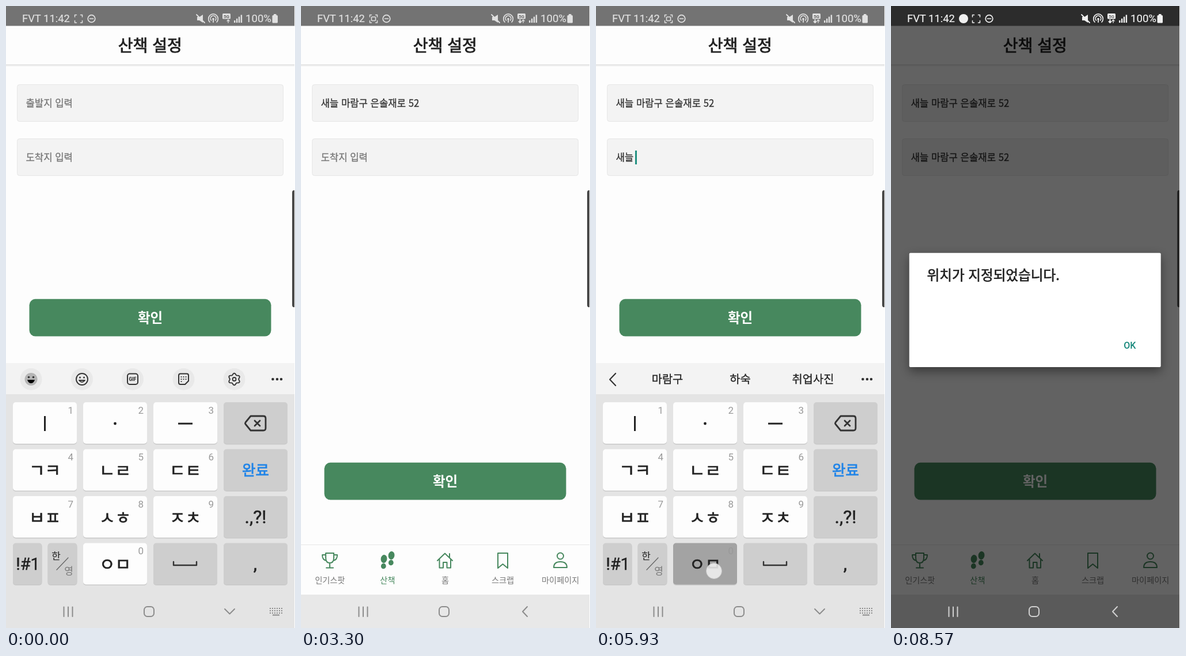
Recreate the animation shown at these times as an HTML page. Size 502 px wide and 1080 px high, loop 8.61 s.

```html
<!DOCTYPE html>
<html lang="ko">
<head>
<meta charset="utf-8">
<style>
html, body { margin: 0; width: 100%; height: 100%; overflow: hidden; background: #fdfdfd; }
svg { display: block; width: 100vw; height: 100vh; }
text { font-family: "Noto Sans CJK KR", "Noto Sans CJK JP", "Noto Sans CJK", sans-serif; white-space: pre; }
.r { font-family: Roboto, sans-serif; }
.m { text-anchor: middle; }
.l { fill: none; stroke: currentColor; stroke-linecap: round; stroke-linejoin: round; }
</style>
</head>
<body>
<svg id="stage" viewBox="0 0 502 1080"></svg>
<script>
const LOOP = 8610, SIZE = 16.7, LEFT = 34.5;
const ADDR = ['새늘', '마람구', '은솔재로', '52'];
const stage = document.getElementById('stage');

const text = (x, y, size, fill, str, cls = '', more = '') =>
  `<text x="${x}" y="${y}" font-size="${size}" fill="${fill}" class="${cls}" ${more}>${str}</text>`;
const rect = (x, y, w, h, r, fill, more = '') =>
  `<rect x="${x}" y="${y}" width="${w}" height="${h}" rx="${r}" fill="${fill}" ${more}/>`;
const dot = (x, y, r, fill = 'currentColor', more = '') =>
  `<circle cx="${x}" cy="${y}" r="${r}" fill="${fill}" ${more}/>`;
const line = (d, w = 2, more = '') => `<path class="l" d="${d}" stroke-width="${w}" ${more}/>`;
const group = (id, body, more = '') => `<g id="${id}" ${more}>${body}</g>`;
const BOLD = 'font-weight="700"';
// Thin outline for weights between regular and bold
const heavy = (color, w = .5) => `stroke="${color}" stroke-width="${w}"`;

// Keys: id, x, y, width, kind
const COLS = [12, 134, 256, 378], ROWS = [688, 769.5, 851, 932.5];
const LETTERS = ['', '', '', 'ㄱㅋ', 'ㄴㄹ', 'ㄷㅌ', 'ㅂㅍ', 'ㅅㅎ', 'ㅈㅊ', 'ㅇㅁ'];
const keys = [];
for (let i = 0; i < 9; i++) keys.push([`k${i + 1}`, COLS[i % 3], ROWS[i / 3 | 0], 111, '#fdfdfd']);
keys.push(['k0', 134, ROWS[3], 111, '#fdfdfd']);
ROWS.forEach((y, i) => keys.push([['del', 'done', 'punct', 'comma'][i], 378, y, 111, '#cecece']));
keys.push(['space', 256, ROWS[3], 111, '#cecece'], ['sym', 12, ROWS[3], 50.5, '#cecece'], ['lang', 72.5, ROWS[3], 51, '#cecece']);

function keyCaps() {
  let s = '';
  for (const [id, x, y, w, fill] of keys)
    s += rect(x, y + 1.5, w, 72, 5, '#c9c9c9') + rect(x, y, w, 72, 5, fill, `id="${id}"`);
  keys.slice(0, 10).forEach(([, x, y], i) => {
    s += text(x + 105, y + 19.5, 17, '#999', (i + 1) % 10, 'r', 'text-anchor="end"');
    if (LETTERS[i]) s += text(x + 55.5, y + 47.5, 30, '#222', LETTERS[i], 'm', heavy('#222', .7));
  });
  s += rect(66, 712, 3, 26, 0, '#222') + dot(189.5, 725, 2.4, '#222') + rect(299, 723.6, 25, 3, 0, '#222');
  s += line('M425 712H447Q451 712 451 716V733Q451 737 447 737H425L416 726Q415 724.5 416 723ZM432 720L441 729M441 720L432 729', 2.8);
  s += text(433.5, 815, 25.5, '#1f84e8', '완료', 'm', heavy('#1f84e8', .8));
  s += text(433.5, 898, 32, '#222', '.,?!', 'r m', heavy('#222')) + text(433, 979, 32, '#222', ',', 'r m', heavy('#222'));
  s += text(38, 979, 29, '#222', '!#1', 'r m', heavy('#222'));
  s += text(87, 961, 17, '#222', '한', 'm') + text(109, 987, 17, '#777', '영', 'm') + line('M88 979L108 958', 1.3, 'color="#666"');
  return s + line('M291 965V971H331V965', 2.4);
}

function toolbar() {
  let s = '';
  for (const x of [43.5, 132, 220, 308.5, 396.5]) s += dot(x, 648, 19, '#e9e9e9');
  s += dot(43.5, 648, 11, '#b5b5b5') + dot(39.5, 644.5, 1.8) + dot(47.5, 644.5, 1.8) + '<path d="M37 649H50Q48 655 43.5 655Q39 655 37 649Z"/>';
  s += line('M122 648a10 10 0 1 0 20 0a10 10 0 1 0 -20 0M127 650Q132 656 137 650Z', 1.9) + dot(128.5, 645, 1.5) + dot(135.5, 645, 1.5);
  s += rect(211, 638.5, 18, 18.5, 4, 'none', 'stroke="#333" stroke-width="2"') + text(220, 651, 8.5, '#222', 'GIF', 'r m', BOLD);
  s += line('M303 638.5H314Q317 638.5 317 641.5V651L311 657H303Q300 657 300 654V641.5Q300 638.5 303 638.5Z');
  for (let i = 0; i < 7; i++) s += dot(304.5 + i % 3 * 4, 644 + (i / 3 | 0) * 4, 1.1);
  let gear = '';
  for (let i = 0; i < 48; i++) {
    const a = i * Math.PI / 24, r = 9 + 1.4 * Math.cos(a * 6);
    gear += `${i ? 'L' : 'M'}${(396.5 + r * Math.sin(a)).toFixed(1)} ${(648 - r * Math.cos(a)).toFixed(1)}`;
  }
  return s + line(gear + 'Z', 1.9) + dot(396.5, 648, 3, 'none', 'stroke="#333" stroke-width="1.8"');
}

function tabs() {
  const foot = (x, y) => `<g transform="translate(${x} ${y}) rotate(8)" fill="currentColor"><ellipse cx="0" cy="-4" rx="5.4" ry="7.2"/><ellipse cx="1" cy="8.5" rx="4.4" ry="4.8"/></g>`;
  let s = rect(0, 935, 502, 87, 0, '#fdfdfd') + rect(0, 935, 502, 1, 0, '#e6e6e6') + '<g color="#47885e">';
  s += line('M43 950H57V958Q57 967 50 967Q43 967 43 958ZM43 953H37Q37 962 44 963M57 953H63Q63 962 56 963M50 967V975M44 975.5H56');
  s += foot(143.5, 964) + foot(156.5, 958);
  s += line('M237 963L250 950.5L263 963M240.5 961V975.5H247V966H253.5V975.5H260V961M258 957V951');
  s += line('M342 950H359V976L350.5 969L342 976Z');
  s += dot(450.5, 955, 5.5, 'none', 'stroke="currentColor" stroke-width="2"') + line('M439 975Q439 965 450.5 965Q462 965 462 975Z') + '</g>';
  ['인기스팟', '산책', '홈', '스크랩', '마이페이지'].forEach((t, i) => s += text(50.3 + i * 100.1, 1002, 14.2, i == 1 ? '#47885e' : '#777', t, 'm'));
  return s;
}

function status() {
  let s = text(28, 28, 18.4, 'currentColor', 'FVT 11:42', 'r', heavy('currentColor', .2));
  s += group('chat', dot(126, 22, 8));
  s += group('notes',
    line('M119.5 19V15.5H122.5M129.5 15.5H132.5V19M132.5 25.5V29H129.5M122.5 29H119.5V25.5', 1.5) +
    group('lens', rect(122.5, 19, 7, 6.5, 1, 'none', 'stroke="currentColor" stroke-width="1.6"')) +
    dot(148.5, 22, 6.3, 'none', 'stroke="currentColor" stroke-width="1.7"') + line('M145.5 22H151.5', 1.7));
  s += '<path fill="currentColor" d="M332 19H336L342 15V29L336 25H332Z"/>' + line('M331 15L345 29', 1.8);
  s += line('M354 28A8.3 8.3 0 1 1 366 28M356.5 25A4.8 4.8 0 1 1 363.5 25', 1.7) + dot(360, 22.5, 1.8) + line('M360 23V28', 1.8);
  s += rect(376, 13, 14, 9.5, 1.5, 'currentColor') + text(383, 21, 8, '#666', '5G', 'r m', BOLD);
  s += group('data', line('M380.5 24V29M378.5 27L380.5 29L382.5 27')) + line('M386 29V24.5M384 26L386 24L388 26', 1.3);
  for (let i = 0; i < 4; i++) s += rect(396 + i * 3.9, 25 - i * 3.2, 2.4, 4 + i * 3.2, 0, 'currentColor');
  s += text(416, 28, 18.6, 'currentColor', '100%', 'r', heavy('currentColor', .2));
  return s + rect(462.5, 16, 9.5, 13.5, 1.5, 'currentColor') + rect(465, 14, 4.5, 3, 0, 'currentColor');
}

function keypadIcon() {
  let s = '';
  for (let i = 0; i < 18; i++) s += rect(458 + i % 6 * 4, 1045 + (i / 6 | 0) * 4, 2, 2, 0, 'currentColor');
  return s + rect(463, 1056.5, 12, 2, 0, 'currentColor');
}

const field = (y, id) => rect(19.5, y, 462, 64, 4, '#f3f3f3', 'stroke="#e6e6e6"') +
  text(LEFT, y + 38.7, SIZE, 'currentColor', '', '', `id="${id}" ${heavy('currentColor', .3)}`);

stage.innerHTML = '<defs><filter id="blur" x="-20%" y="-30%" width="140%" height="160%"><feGaussianBlur stdDeviation="9"/></filter></defs>' +
  rect(0, 0, 502, 1080, 0, '#fdfdfd') + rect(0, 0, 502, 34.5, 0, '#737373') +
  rect(0, 101.5, 502, 1.5, 0, '#dedede') + rect(0, 103, 502, 2, 0, '#f3f3f3') +
  text(250.3, 79, 28, '#222', '산책 설정', 'm', heavy('#222', .9)) +
  field(136.5, 'from') + field(230.5, 'to') +
  rect(0, 0, 80, 1.2, 0, '#444', 'id="under"') + rect(0, 0, 3, 24, 0, '#1f8f80', 'id="caret"') +
  group('confirm', rect(40.5, 508.8, 420, 64.7, 10.5, '#47885e') + text(250.5, 550, 23.5, '#fff', '확인', 'm', BOLD)) +
  group('tabs', tabs() + rect(0, 1022, 502, 58, 0, '#e8e8e8')) +
  group('board', rect(0, 620, 502, 460, 0, '#e4e4e4') + rect(0, 620, 502, 54, 0, '#f3f3f3') +
    group('tools', toolbar()) +
    group('words', line('M34 638L24 648.5L34 659', 2.2) + [124, 250.5, 377].map((x, i) => text(x, 655, 19.8, '#222', '', 'm', `id="w${i}" ${heavy('#222', .3)}`)).join('')) +
    [463.5, 471, 478].map(x => dot(x, 648, 2.3)).join('') + keyCaps(), 'color="#333"') +
  rect(0, 0, 502, 1080, 0, '#000', 'id="dim"') +
  group('status', status()) +
  group('nav', line('M100.5 1043.5V1060M108 1043.5V1060M115.5 1043.5V1060') +
    rect(240, 1043, 17, 17, 5.5, 'none', 'stroke="currentColor" stroke-width="2"') +
    group('down', line('M380 1047L388.5 1055.5L397 1047') + keypadIcon()) + group('back', line('M393 1043L385 1051.5L393 1060'))) +
  group('dialog', rect(32, 435, 437, 200, 4, '#000', 'opacity=".4" filter="url(#blur)"') + rect(31.7, 428.7, 437, 198.3, 2, '#fff') +
    text(62.5, 476, 23.6, '#222', '위치가 지정되었습니다.', '', heavy('#222', .7)) + text(414.7, 595, 16, '#16877a', 'OK', 'r m', 'font-weight="500"')) +
  '<path id="edge" d="M502 320H500Q497 320 497 324V519Q497 523 500 523H502Z"/>' +
  rect(501, 0, 1, 1080, 0, '#fff') +
  [0, 1].map(i => dot(0, 0, 13.5, '#f4f4f4', `id="touch${i}" stroke="#ccc"`)).join('');

const el = {};
stage.querySelectorAll('[id]').forEach(n => el[n.id] = n);
const show = (n, on) => n.setAttribute('display', on ? 'inline' : 'none');
const set = (n, attrs) => { for (const k in attrs) n.setAttribute(k, attrs[k]); };
const ramp = (t, a, d) => Math.min(1, Math.max(0, (t - a) / d));

// Touches: time, x, y, key
const taps = [
  [180, 190, 889, 'k8'], [360, 50, 722, 'k1'], [500, 194, 728, 'k2'], [640, 48, 720, 'k1'],
  [960, 124, 650], [1370, 204, 980, 'k0'], [1560, 124, 650], [1810, 124, 650],
  [2500, 38, 968, 'sym'], [2680, 190, 806, 'k5'], [2840, 190, 726, 'k2'], [3040, 433, 806, 'done'],
  [3840, 415, 590], [4190, 200, 263],
  [4560, 190, 889, 'k8'], [4660, 50, 722, 'k1'], [4765, 195, 729, 'k2'], [4870, 47, 720, 'k1'],
  [5420, 124, 650], [5900, 205, 981, 'k0'], [6340, 124, 650], [6960, 124, 650],
  [7540, 38, 968, 'sym'], [7700, 190, 806, 'k5'], [7860, 190, 726, 'k2'], [8050, 433, 806, 'done']
];

// Typing: time, text, suggestions, composing syllable
const near = [ADDR[0], '단국대', '대박'], area = [ADDR[1], '하숙', '취업사진'];
const road = [ADDR[2], '나', '아'], plain = ['나', '아', '난'];
const first = ADDR[0] + ' ', second = first + ADDR[1] + ' ', third = second + ADDR[2] + ' ';
const steps = times => [
  ['', null], ['ㅅ', plain, 1], ['시', near, 1], ['사', near, 1], ['새', near, 1], [first, area],
  [first + 'ㅁ', area, 1], [second, road], [third, plain], [third + '5', plain], [third + '52', plain]
].map((s, i) => [times[i], ...s]);
const entry = [
  steps([-530, 230, 400, 540, 680, 1010, 1430, 1610, 1860, 2730, 2890]),
  steps([4250, 4600, 4700, 4800, 4890, 5460, 5970, 6390, 7000, 7750, 7910])
];
const current = (list, t) => list.filter(s => s[0] <= t).pop();

const widthOf = s => [...s].reduce((w, c) => w + SIZE * (c == ' ' ? .224 : c < 'z' ? .555 : .92), 0);

function setField(node, str, hint) {
  node.textContent = str || hint;
  node.setAttribute('color', str ? '#333' : '#777');
}

function draw(t) {
  const lap = t < 4200 ? 0 : 1;
  const step = current(entry[lap], t) || [0, '', null];
  const open = t < 4250 ? 1 - ramp(t, 3110, 130) : ramp(t, 4290, 200) * (1 - ramp(t, 8110, 130));
  const typing = t < 3110 || t >= 4250 && t < 8110;
  const modal = t < 4200 ? ramp(t, 3430, 100) * (1 - ramp(t, 3900, 110)) : ramp(t, 8400, 110);

  setField(el.from, lap ? third + ADDR[3] : step[1], '출발지 입력');
  setField(el.to, lap ? step[1] : '', '도착지 입력');
  const end = LEFT + widthOf(step[1]), top = lap ? 251 : 157;
  show(el.caret, typing && (t - step[0]) % 1000 < 500);
  set(el.caret, { x: end - 1, y: top });
  show(el.under, typing && step[3]);
  set(el.under, { x: end - 15, y: top + 20, width: 15 });

  const words = typing && step[2];
  show(el.tools, !words);
  show(el.words, words);
  if (words) words.forEach((w, i) => el['w' + i].textContent = w);

  const shut = open < .5;
  set(el.board, { transform: `translate(0 ${(1 - open) * 460})` });
  show(el.board, open > 0);
  set(el.confirm, { transform: `translate(0 ${shut ? 284 : 0})` });
  show(el.tabs, open < 1);
  show(el.down, !shut);
  show(el.back, shut);

  set(el.dim, { opacity: modal * .61 });
  set(el.dialog, { opacity: modal });
  set(el.edge, { fill: modal > .5 ? '#252525' : '#484848' });
  set(el.status, { color: modal > .5 ? '#f0f0f0' : '#e0e0e0' });
  set(el.nav, { color: modal > .5 ? '#d0d0d0' : '#8c8c8c' });
  const chat = t >= 6600;
  show(el.chat, chat);
  set(el.notes, { transform: `translate(${chat ? 22 : 0} 0)` });
  show(el.lens, t > 700 && t < 8200);
  show(el.data, t > 3300 && t < 4600 || t > 5500 && t < 6500 || t > 8100);

  for (const [id, , , , fill] of keys) el[id].setAttribute('fill', fill);
  const live = taps.filter(p => t >= p[0] && t < p[0] + 200).slice(-2);
  for (let i = 0; i < 2; i++) {
    const p = live[i], n = el['touch' + i];
    show(n, p);
    if (!p) continue;
    const age = t - p[0];
    set(n, { cx: p[1], cy: p[2], opacity: .85 * (1 - ramp(age, 90, 110)) });
    if (p[3] && age < 90) el[p[3]].setAttribute('fill', '#a3a3a3');
  }
}

const start = performance.now();
function tick(now) {
  draw(Math.max(0, now - start) % LOOP);
  requestAnimationFrame(tick);
}
draw(0);
requestAnimationFrame(tick);
</script>
</body>
</html>
```
